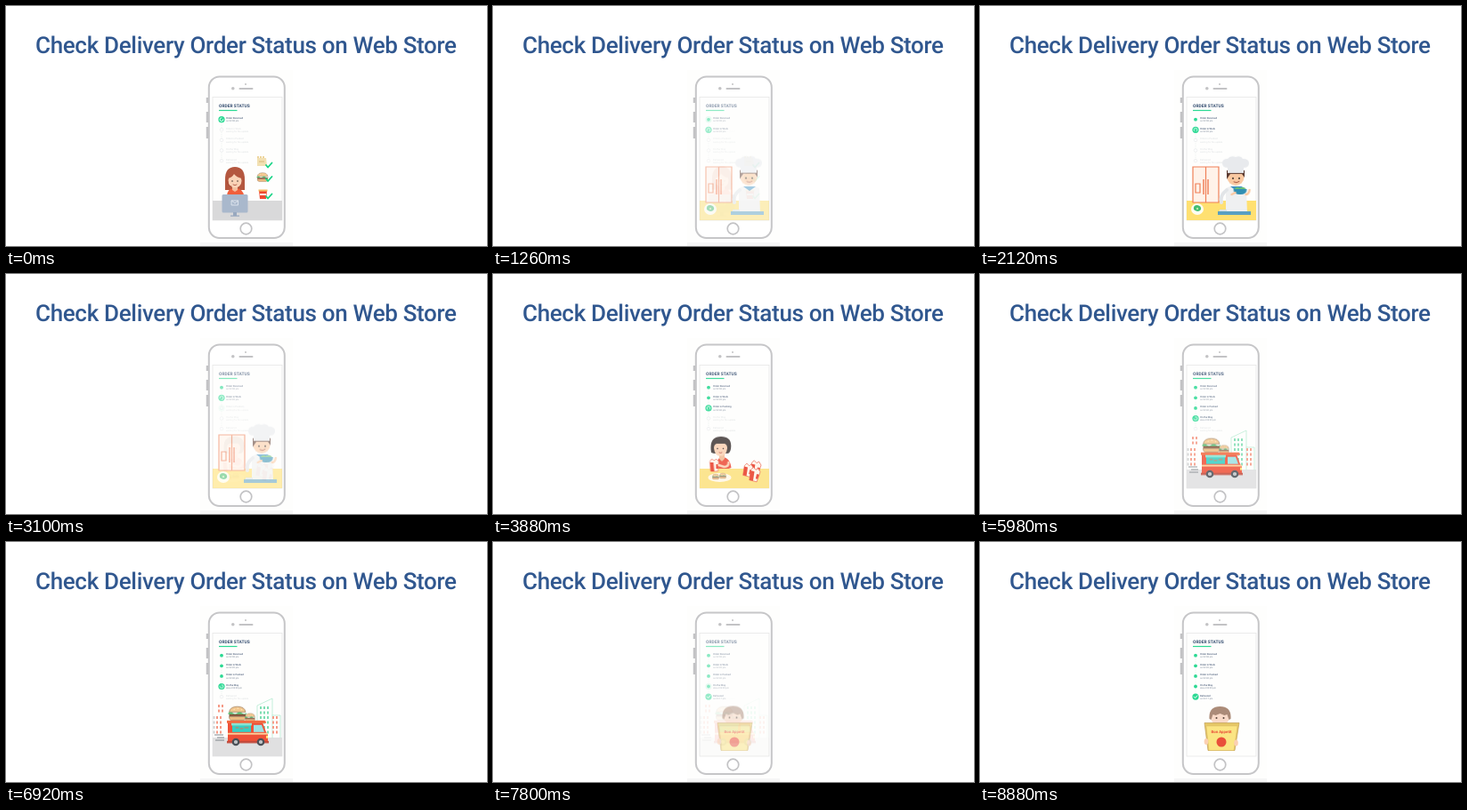
These frames come from a looping animation (540x270 px, 8.9 s). An HTML page:

```html
<!DOCTYPE html>
<html lang="en">
<head>
<meta charset="utf-8">
<title>Check Delivery Order Status</title>
<style>
html, body { margin: 0; width: 100%; height: 100%; overflow: hidden; background: #fff; }
svg { display: block; width: 540px; height: 270px; }
text { font-family: Roboto, "Liberation Sans", sans-serif; text-rendering: geometricPrecision; }
.title { font-size: 26px; font-weight: 500; letter-spacing: -.33px; fill: #30578f; }
.head { font-size: 4.9px; font-weight: 700; fill: #344d70; }
.label { font-size: 2.8px; font-weight: 500; fill: #4d5f7b; }
.time { font-size: 2.6px; fill: #7d899a; }
.todo text { fill: #dcdfe1; font-weight: 400; }
.line { fill: none; stroke-linecap: round; stroke-linejoin: round; }

.scene { animation: 8.9s linear infinite both; }
#s1 { animation-name: one; }
#s2 { animation-name: two; }
#s3 { animation-name: three; }
#s4 { animation-name: four; }
#s5 { animation-name: five; }
@keyframes one { 0%, 7.75% { opacity: 1 } 14.94%, 100% { opacity: 0 } }
@keyframes two { 0%, 9.44% { opacity: 0 } 19.55%, 31.69% { opacity: 1 } 38.88%, 100% { opacity: 0 } }
@keyframes three { 0%, 34.38% { opacity: 0 } 44.72%, 56.29% { opacity: 1 } 63.48%, 100% { opacity: 0 } }
@keyframes four { 0%, 58.43% { opacity: 0 } 68.76%, 81.24% { opacity: 1 } 88.43%, 100% { opacity: 0 } }
@keyframes five { 0%, 82.7% { opacity: 0 } 92.81%, 100% { opacity: 1 } }

.spin { transform-box: fill-box; transform-origin: center; animation: spin .89s linear infinite; }
.bob { animation: bob .445s ease-in-out infinite alternate; }
.nod { animation: bob .89s ease-in-out infinite alternate; }
.stir { animation: stir .445s ease-in-out infinite alternate; }
.bowl { animation: bowl 8.9s linear infinite both; }
@keyframes spin { to { transform: rotate(360deg) } }
@keyframes bob { to { transform: translateY(-.6px) } }
@keyframes stir { from { transform: translateX(-.7px) } to { transform: translateX(.7px) } }
@keyframes bowl { 0%, 15% { opacity: 0; transform: translateY(6px) } 20%, 100% { opacity: 1; transform: none } }
</style>
</head>
<body>
<svg viewBox="0 0 540 270">
  <defs>
    <symbol id="burger" viewBox="0 0 20 15" overflow="visible">
      <path d="M1 6Q2 0 10 0T19 6Z" fill="#f3c78e" stroke="#8a6a4c" stroke-width=".6"/>
      <path d="M6 3h1M10 2h1M14 3.400h1" stroke="#fff0c8"/>
      <path d="M0 7q2.500-2 5 0t5 0 5 0 5 0v1.500H0Z" fill="#5fc27a"/>
      <path d="M1 8.500h18v2.500H1Z" fill="#84523b"/>
      <path d="M1 11h18q0 4-3 4H4q-3 0-3-4Z" fill="#f0bd82" stroke="#8a6a4c" stroke-width=".6"/>
    </symbol>
    <symbol id="bag" viewBox="0 0 10 14" overflow="visible">
      <path d="M0 3 2 0l3 2 2-2 3 3-1 11H1Z" fill="#fff4ea" stroke="#e9583f" stroke-width=".6"/>
      <path d="M0 4h4l1 10H1ZM7 6h2.700l-.5 5H7Z" fill="#e9422f"/>
    </symbol>
  </defs>

  <path d="M0 0h540v270H0Z" fill="#fff"/>
  <text class="title" x="33" y="53">Check Delivery Order Status on Web Store</text>

  <path d="M218 72h104v198H218Z" fill="#fefefd"/>
  <path d="M218 266h104v4H218Z" fill="#f6f6f6"/>
  <path d="M226 103v6M226 119v12M226 136v13" stroke="#c3c3c5" stroke-width="2.500"/>
  <rect x="227.800" y="79.500" width="85" height="181.500" rx="12" fill="#fff" stroke="#c6c6c8" stroke-width="2"/>
  <g fill="#c3c3c5">
    <circle cx="254.800" cy="92.700" r="1.800"/>
    <circle cx="269" cy="88" r="1"/>
    <rect x="261.500" y="92" width="16" height="2" rx="1"/>
  </g>
  <circle cx="269.500" cy="250.500" r="6.300" fill="#fff" stroke="#c3c3c5" stroke-width="1.700"/>
  <rect x="232" y="102.500" width="78" height="138.500" fill="#fefefd" stroke="#e6e6e6" stroke-width=".8"/>

  <g class="scene" id="s1">
    <path d="M232 219h78v22h-78Z" fill="#d9d9da"/>
    <g class="nod">
      <path d="M246 207v-12q0-14 11-14t11 14v12Z" fill="#b4573f"/>
      <path d="M248 214q0-9 9-9t10.500 9Z" fill="#f05f3c"/>
      <path d="M254 202h6v5l-3 2-3-2Z" fill="#f3bd9d"/>
      <ellipse cx="257" cy="196.500" rx="7.500" ry="8" fill="#fad3b7"/>
      <path d="M249 194q1-10 8-10t8 10q-6-1-9-5-2 4-7 5Z" fill="#b4573f"/>
      <circle cx="254" cy="197" r=".8" fill="#45352f"/>
      <circle cx="260" cy="197" r=".8" fill="#45352f"/>
      <path class="line" d="M255 201q2 1.500 4 0M249 197v3q1 3 4 3" stroke="#a74937" stroke-width=".8"/>
    </g>
    <rect x="242.500" y="212" width="29" height="20.500" rx="1.500" fill="#a9b8cc"/>
    <path d="M255 232h4v3.500h3v1.200h-10v-1.200h3Z" fill="#98a8bf"/>
    <path class="line" d="M253.500 219h7v5h-7Zm0 0 3.500 3 3.500-3" stroke="#e1e8f1" stroke-width=".9"/>
    <path d="M282 171h10l1 9h-11Z" fill="#f2e0b2"/>
    <path d="M283 171v-2m3 2v-2m3 2v-2" stroke="#e4bd69" stroke-width="1.300"/>
    <path d="M284 175h6" stroke="#d8b679"/>
    <use href="#burger" x="281.500" y="187.500" width="13" height="10"/>
    <path d="M284 208h9l-1 9h-7Z" fill="#ee4931"/>
    <path d="M283.500 206.500h10v2h-10Z" fill="#f6ba61"/>
    <path d="M285 211h7v2h-7Z" fill="#fff0e7"/>
    <path class="line" d="m292 179 2 2.500 4.500-5m-6.500 18 2 2.500 4.500-5m-6.500 22 2 2.500 4.500-5" stroke="#18d486" stroke-width="1.800"/>
  </g>

  <g class="scene" id="s2">
    <path d="M232 219h78v22h-78Z" fill="#ffe071"/>
    <path d="M239 181h29v40h-29ZM253.500 181v40M242 200h5v10h-5Z" fill="#fff2e9" stroke="#ef8058" stroke-width="1.200"/>
    <path d="M251 195v17M256 195v17" stroke="#ee7148" stroke-width="1.300"/>
    <path d="M276 205q11-7 23 0l1 29h-24Z" fill="#eff0f1"/>
    <path d="M277 207q-8 6-6 14" class="line" stroke="#e2e5e8" stroke-width="4"/>
    <path d="M281 203h14l-7 5Z" fill="#3c92c5"/>
    <g class="nod">
      <ellipse cx="287" cy="193" rx="9.500" ry="9" fill="#fac9a2"/>
      <path d="M277 195v-10h20v8l-3-4h-13Z" fill="#59382e"/>
      <path d="M278 188v-6q-6 0-6-5 0-5 6-5 3-4 9-2 6-2 8 2 7 0 7 5t-6 5v6Z" fill="#e8eaed"/>
      <circle cx="284" cy="194" r="1" fill="#352822"/>
      <circle cx="291" cy="194" r="1" fill="#352822"/>
      <path class="line" d="M285 198q3 2 6-.5" stroke="#9b4434" stroke-width=".9"/>
    </g>
    <g class="bowl"><g class="stir">
      <path d="M284 206h15q0 6-7.500 6t-7.500-6Z" fill="#318fb2"/>
      <path d="M285 206q3-4 6-1 4-3 7 1Z" fill="#68bf77"/>
      <path class="line" d="M298 212q3 0 4-5M282 212l4-2" stroke="#fac9a2" stroke-width="2.500"/>
    </g></g>
    <path d="M267 231h37v4h-37Z" fill="#599fc2"/>
    <path d="M269 229h8v2h-8Z" fill="#d9e3e6"/>
    <ellipse cx="244" cy="228.500" rx="7" ry="6.500" fill="#fffdf1"/>
    <path d="M240 229q-1-5 4-5 5 1 4 5-3 4-8 0Z" fill="#45bd71"/>
    <circle cx="244" cy="228" r="1.200" fill="#b8e5a8"/>
  </g>

  <g class="scene" id="s3">
    <path d="M232 219h78v22h-78Z" fill="#fce283"/>
    <path d="M251 219q0-13 6-13 9 0 10.500 12l-3 1Z" fill="#ed5440"/>
    <g class="nod">
      <path d="M254 201h6v7l-3 3-3-3Z" fill="#f2bd9a"/>
      <path d="M245 201q-3-18 11-18 13 0 11 14-1 5-4 5h-15Z" fill="#4a4241"/>
      <path d="M248 196q0-4 3-5h9q3 1 3 5-1 9-7.500 9t-7.500-9Z" fill="#fbd3b6"/>
      <circle cx="252" cy="196.500" r=".8" fill="#3f3535"/>
      <circle cx="258.500" cy="196.500" r=".8" fill="#3f3535"/>
      <path class="line" d="M254 201q1.500 1 3 0" stroke="#b64b3f" stroke-width=".8"/>
    </g>
    <ellipse cx="254.500" cy="229" rx="13" ry="5" fill="#fff8e8"/>
    <use href="#burger" x="246" y="225" width="8" height="6"/>
    <use href="#burger" x="254" y="224" width="8" height="6"/>
    <g class="stir">
      <use href="#bag" x="243" y="208" width="10" height="14"/>
      <path class="line" d="M264 212q0 5-5 5l-6-2" stroke="#fbd3b6" stroke-width="2.500"/>
    </g>
    <g transform="rotate(14 290 222)">
      <use href="#bag" x="288" y="209" width="11" height="16"/>
      <use href="#bag" x="281" y="214" width="10" height="15"/>
      <use href="#bag" x="289" y="217" width="11" height="15"/>
    </g>
  </g>

  <g class="scene" id="s4">
    <path d="M232 220h78v21h-78Z" fill="#e0e0e1"/>
    <path class="line" d="M282 220v-36l17-8v44M299 195h9v25" stroke="#a9e8cb" stroke-width=".7"/>
    <g id="windows"></g>
    <path d="M234 217h10m-7 3h8m-10 3h10" stroke="#666d75" stroke-width=".8"/>
    <g class="bob">
      <use href="#burger" x="249.500" y="185" width="20.500" height="16"/>
      <use href="#burger" x="268" y="193" width="12" height="9"/>
      <path d="M249 203h39l4 11 2 2v10h-45Z" fill="#ef5138"/>
      <path d="M248 201h42q2 0 2 3h-44Z" fill="#f26a42"/>
      <path d="M249 215h45v1.800h-45Z" fill="#ffd9a0"/>
      <path d="M254 204h21v10h-21Z" fill="#35cfc4"/>
      <path d="M253 204h23v2.500h-23Z" fill="#8ee5d4"/>
      <path d="M278 206h9l3 8h-12Z" fill="#9be2e4"/>
      <path d="M248 224h47v2.500h-47Z" fill="#c2483a"/>
      <path d="M292 218h2v3h-2Z" fill="#ffe278"/>
      <path class="line" d="M258 209h3m2 1h3m2-1h4" stroke="#eb6b50"/>
    </g>
    <g id="wheels"></g>
  </g>

  <g class="scene" id="s5">
    <g class="nod">
      <ellipse cx="269.500" cy="197" rx="10.500" ry="9.500" fill="#f9dac8"/>
      <path d="M257.500 199q-1-14 12-14t12 14l-2 1-2-6-3 1-5-2-5 2-3-1-2 6Z" fill="#ab8b78"/>
      <circle cx="265.500" cy="198" r="1" fill="#57453b"/>
      <circle cx="273.500" cy="198" r="1" fill="#57453b"/>
    </g>
    <path d="M252 203.500h39l-5 31h-30Z" fill="#e5c766" stroke="#c29f58" stroke-width=".7"/>
    <path d="M254 207h35l-4 27.500h-28Z" fill="#fbe583" stroke="#d9b964" stroke-width=".5"/>
    <ellipse cx="254" cy="224.500" rx="2.300" ry="3.500" fill="#fbd0b2"/>
    <ellipse cx="287.500" cy="226" rx="2.300" ry="3.500" fill="#fbd0b2"/>
    <text x="271" y="214.500" text-anchor="middle" font-size="4.400" font-weight="700" fill="#e9503a">Bon Appetit</text>
    <circle cx="271" cy="225" r="5.500" fill="#e9503a"/>
  </g>
</svg>
<script>
const green = '#2bd993';
const steps = [
  ['Order Received', 'on 02:08 pm'],
  ['Order in Work', 'on 02:20 pm'],
  ['Order is Packed', 'on 02:40 pm'],
  ['On the Way', 'about 03:00 pm'],
  ['Delivered', 'on 03:17 pm']
];

function add(id, markup) {
  document.getElementById(id).insertAdjacentHTML('beforeend', markup);
}

function marker(y, i, active) {
  if (i > active) {
    return `<circle cx="242" cy="${y}" r="1.800" fill="#fff" stroke="#e6e8e9" stroke-width=".6"/>`;
  }
  if (i < active) return `<circle cx="242" cy="${y}" r="1.900" fill="${green}"/>`;
  const disc = `<circle cx="242" cy="${y}" r="3.600" fill="${green}"/>`;
  if (i === 4) {
    return disc + `<path class="line" d="M240.300 ${y}l1.300 1.400 2.300-2.700" stroke="#fff" stroke-width=".9"/>`;
  }
  return disc + `<circle class="spin line" cx="242" cy="${y}" r="1.900" stroke="#fff" stroke-width=".8" stroke-dasharray="8 4"/>`;
}

function status(active) {
  const rows = steps.map(([label, time], i) => {
    const y = 127.7 + i * 11.6;
    const name = i === 2 && active === 2 ? 'Order is Packing' : label;
    const note = i > active ? 'waiting for the update' : time;
    return `<g class="${i > active ? 'todo' : ''}">${marker(y, i, active)}
      <text class="label" x="247" y="${y - .5}">${name}</text>
      <text class="time" x="247" y="${y + 2.6}">${note}</text></g>`;
  });
  return `<text class="head" x="239" y="114.300">ORDER STATUS</text>
    <path d="M239 117.500h20.500" stroke="${green}" stroke-width="1.200"/>
    <path d="M242 128v46" stroke="#dfe4e3" stroke-width=".5" stroke-dasharray="1 1"/>${rows.join('')}`;
}

function windowGrid(x, y, cols, rows, color) {
  let d = '';
  for (let r = 0; r < rows; r++) {
    for (let c = 0; c < cols; c++) d += `M${x + c * 4} ${y + r * 5.5}h2v3h-2Z`;
  }
  return `<path d="${d}" fill="${color}"/>`;
}

steps.forEach((_, i) => add('s' + (i + 1), status(i)));

add('windows',
  windowGrid(285, 185, 3, 6, '#7fddb2') +
  windowGrid(299, 196, 2, 4, '#f59a86') +
  windowGrid(238, 183, 2, 2, '#f59a86') +
  windowGrid(232.5, 196, 1, 4, '#cfd1d3') +
  windowGrid(236, 196, 2, 4, '#f59a86'));

add('wheels', [258, 286].map(x =>
  `<circle cx="${x}" cy="225" r="4.300" fill="#4a5057"/>
   <circle cx="${x}" cy="225" r="2" fill="#d5d8da"/>
   <path class="spin" d="M${x - 1.8} 225h3.600" stroke="#8f969c" stroke-width=".7"/>`).join(''));
</script>
</body>
</html>
```
